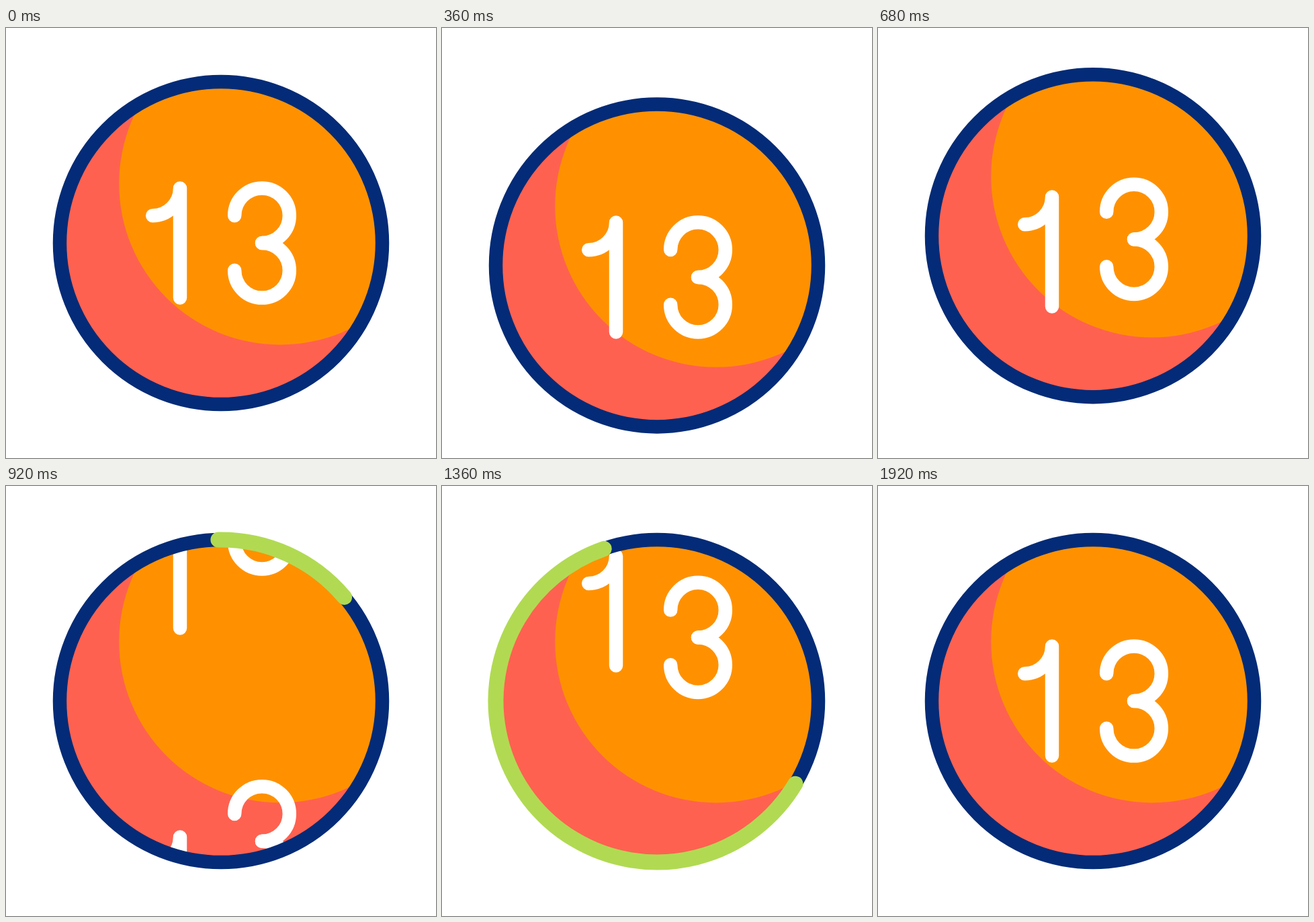
Recreate the animation shown at these times as an HTML page with a canvas. Size 640 by 640 pixels, loop 2000 ms.

```html
<!DOCTYPE html>
<html lang="en">
<head>
<meta charset="utf-8">
<title>Number ball</title>
<style>
html, body { margin: 0; width: 100%; height: 100%; overflow: hidden; background: #fff; }
canvas { display: block; width: 640px; height: 640px; }
</style>
</head>
<body>
<canvas id="stage" width="640" height="640"></canvas>
<script>
const ctx = document.getElementById('stage').getContext('2d');
const LOOP = 2000, STEP = 40, TAU = Math.PI * 2;
const C = 320, R = 240, LINE = 20.48, LAG = 70;
const NAVY = '#032b77', ORANGE = '#ff9100', CORAL = '#ff6150', GREEN = '#b1da52';

// Cubic ease with flat ends; a and b are the horizontal handles.
function ease(x, a = 1 / 3, b = 2 / 3) {
  if (x <= 0) return 0;
  if (x >= 1) return 1;
  let lo = 0, hi = 1, u = x;
  for (let i = 0; i < 24; i++) {
    u = (lo + hi) / 2;
    const v = 1 - u;
    if (3 * a * u * v * v + 3 * b * u * u * v + u * u * u < x) lo = u;
    else hi = u;
  }
  return u * u * (3 - 2 * u);
}

const tween = (t, t0, t1, from, to, a, b) =>
  from + (to - from) * ease((t - t0) / (t1 - t0), a, b);

function ballY(t) {
  if (t < 360) return tween(t, 145, 360, 0, 33.4);
  if (t < 555) return tween(t, 360, 555, 33.4, -32);
  return tween(t, 555, 760, -32, 0);
}

function leaveY(t, lag) {
  const sink = tween(t, 150, 486, 0, 25.6);
  return sink + tween(t - lag, 577, 1037, 0, -345.6, 0.6, 0.5);
}

function enterY(t, lag) {
  const s = t - lag;
  return s < 1243 ? tween(s, 769, 1243, 320, -144) : tween(s, 1243, 1540, -144, 0);
}

function disc(x, y, r) {
  ctx.beginPath();
  ctx.arc(x, y, r, 0, TAU);
}

function one(dy) {
  ctx.beginPath();
  ctx.moveTo(259, 401.5 + dy);
  ctx.lineTo(259, 238.5 + dy);
  ctx.arc(218.2, 238.5 + dy, 40.8, 0, Math.PI / 2);
  ctx.stroke();
}

function three(dy) {
  ctx.beginPath();
  ctx.arc(381, 279.2 + dy, 40.8, Math.PI, Math.PI * 2.5);
  ctx.stroke();
  ctx.beginPath();
  ctx.arc(381, 360.8 + dy, 40.8, -Math.PI / 2, Math.PI);
  ctx.stroke();
}

function digit(shape, t, lag) {
  shape(leaveY(t, lag));
  if (t - lag > 769) shape(enterY(t, lag));
}

function sweep(t) {
  const head = tween(t, 722, 1480, 0, 1, 0.42, 0.58);
  const tail = tween(t, 1008, 1879, 0, 1, 0.42, 0.58);
  if (head - tail < 0.0005) return;
  const top = -Math.PI / 2 - 0.017;
  ctx.beginPath();
  ctx.arc(C, C, R, top + tail * TAU, top + head * TAU);
  ctx.strokeStyle = GREEN;
  ctx.lineWidth = 23;
  ctx.stroke();
}

function draw(t) {
  ctx.fillStyle = '#fff';
  ctx.fillRect(0, 0, 640, 640);
  ctx.lineCap = 'round';
  ctx.lineJoin = 'round';
  ctx.lineWidth = LINE;

  ctx.save();
  ctx.translate(0, ballY(t));

  ctx.save();
  disc(C, C, R);
  ctx.clip();
  ctx.fillStyle = CORAL;
  ctx.fillRect(0, 0, 640, 640);
  disc(408, 231.6, 239.8);
  ctx.fillStyle = ORANGE;
  ctx.fill();
  ctx.strokeStyle = '#fff';
  digit(three, t, 0);
  digit(one, t, LAG);
  ctx.restore();

  disc(C, C, R);
  ctx.strokeStyle = NAVY;
  ctx.stroke();
  sweep(t);
  ctx.restore();
}

const start = performance.now();
function frame() {
  const t = (performance.now() - start) % LOOP;
  draw(Math.floor(t / STEP) * STEP);
  requestAnimationFrame(frame);
}
frame();
</script>
</body>
</html>
```
